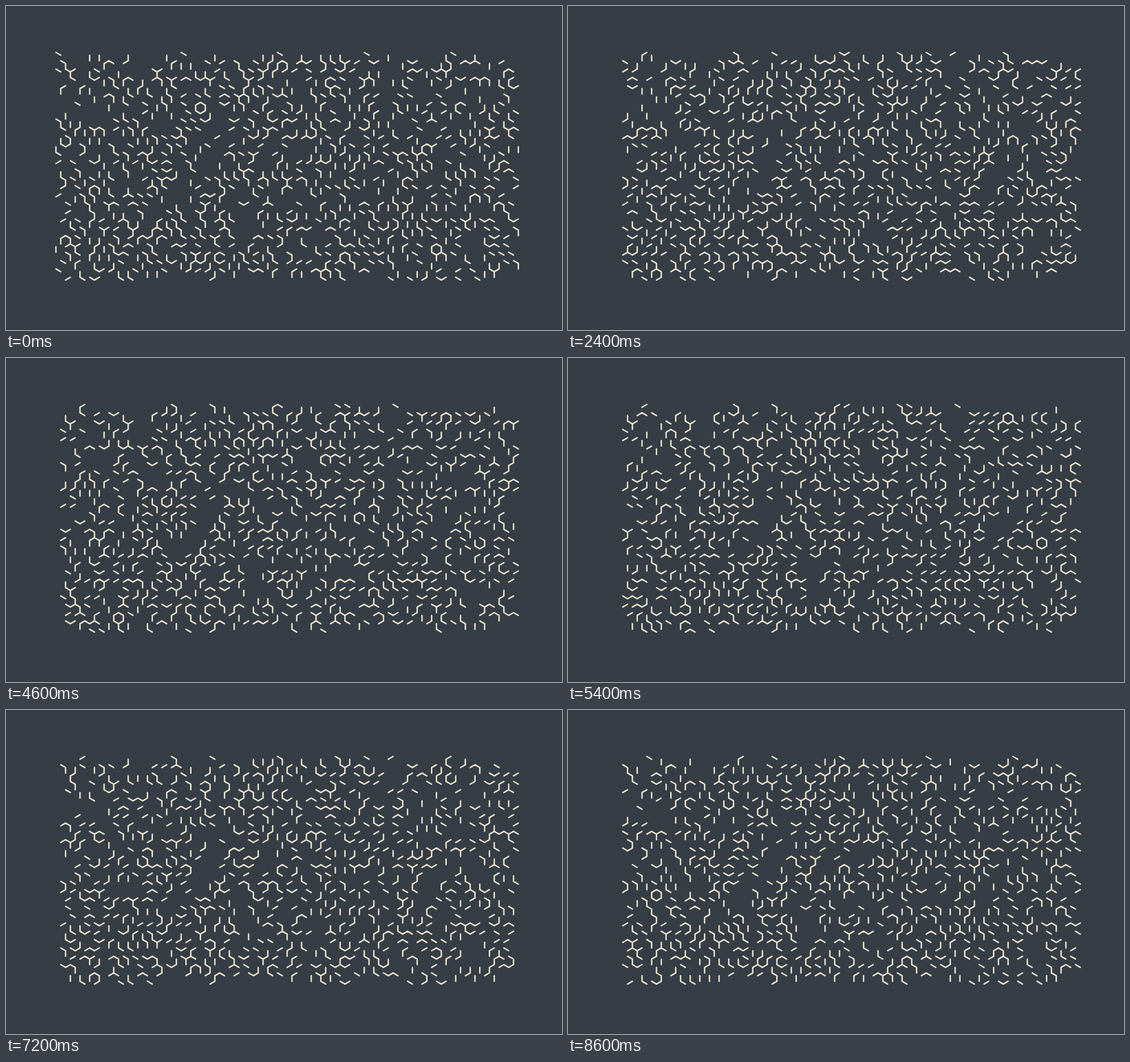
Write an HTML page with a canvas that moves like this. It is 980x572 px and loops after 8800 ms.

```html
<!DOCTYPE html>
<html lang="en">
<head>
<meta charset="utf-8">
<title>Hexagon edges</title>
<style>
html, body { margin: 0; width: 100%; height: 100%; overflow: hidden; background: #373d45; }
canvas { display: block; }
</style>
</head>
<body>
<canvas id="stage" width="980" height="572"></canvas>
<script>
const ctx = document.getElementById('stage').getContext('2d');
const COLS = 96, ROWS = 28, DX = 8.49, DY = 14.7, X0 = 88, Y0 = 82;
const STEP = 200, TURN = 22; // the walk runs forward for TURN steps, then back
const FALLING = 0.34, RISING = 0.2, UPRIGHT = 0.36; // share of each slope at the start

let seed = 20817;
function rnd() {
  seed = (seed + 0x6D2B79F5) | 0;
  let t = Math.imul(seed ^ (seed >>> 15), 1 | seed);
  t = (t + Math.imul(t ^ (t >>> 7), 61 | t)) ^ t;
  return ((t ^ (t >>> 14)) >>> 0) / 4294967296;
}
const pick = list => list[Math.floor(rnd() * list.length)];

// Honeycomb of zigzag rows joined by uprights
const nodes = new Map(), edges = [];
function node(r, c) {
  const key = r * 100 + c;
  if (!nodes.has(key)) {
    nodes.set(key, { x: X0 + c * DX, y: Y0 + r * DY + (r + c) % 2 * DY / 3, edges: [] });
  }
  return nodes.get(key);
}
function addEdge(a, b, chance, inner, rim) {
  const edge = { ends: [a, b], chance, inner, rim };
  a.edges.push(edge);
  b.edges.push(edge);
  edges.push(edge);
}
for (let r = 0; r < ROWS; r++) {
  const top = r === 0, rim = top || r === ROWS - 1;
  for (let c = 0; c <= COLS; c++) {
    const odd = (r + c) % 2;
    if (c < COLS) {
      const chance = odd ? (top ? 0 : RISING) : FALLING * (rim ? 0.5 : 1);
      addEdge(node(r, c), node(r, c + 1), chance, c > 0, rim);
    }
    if (r < ROWS - 1 && odd) {
      addEdge(node(r, c), node(r + 1, c), UPRIGHT, c > 1 && c < COLS, false);
    }
  }
}

// Each line may swing around one of its ends to a free neighbouring edge
function advance(lines) {
  const used = new Set(lines);
  for (const line of lines) {
    if (line.inner && rnd() > 0.4) continue;
    const next = pick(pick(line.ends).edges);
    if (next.inner && !used.has(next) && (!next.rim || rnd() < 0.3)) {
      used.delete(line);
      used.add(next);
    }
  }
  return [...used].filter(line => line.inner);
}

const states = [edges.filter(e => rnd() < e.chance)];
while (states.length <= TURN) states.push(advance(states[states.length - 1]));

function draw(lines) {
  ctx.fillStyle = '#373d45';
  ctx.fillRect(0, 0, 980, 572);
  ctx.strokeStyle = '#ece7d3';
  ctx.lineWidth = 2.5;
  ctx.lineCap = 'round';
  ctx.beginPath();
  for (const { ends: [a, b] } of lines) {
    ctx.moveTo(a.x, a.y);
    ctx.lineTo(b.x, b.y);
  }
  ctx.stroke();
}

const start = performance.now();
let shown = -1;
function tick(now) {
  const k = Math.floor(Math.max(0, now - start) / STEP) % (2 * TURN);
  const i = Math.min(k, 2 * TURN - k);
  if (i !== shown) draw(states[shown = i]);
  requestAnimationFrame(tick);
}
tick(start);
</script>
</body>
</html>
```
